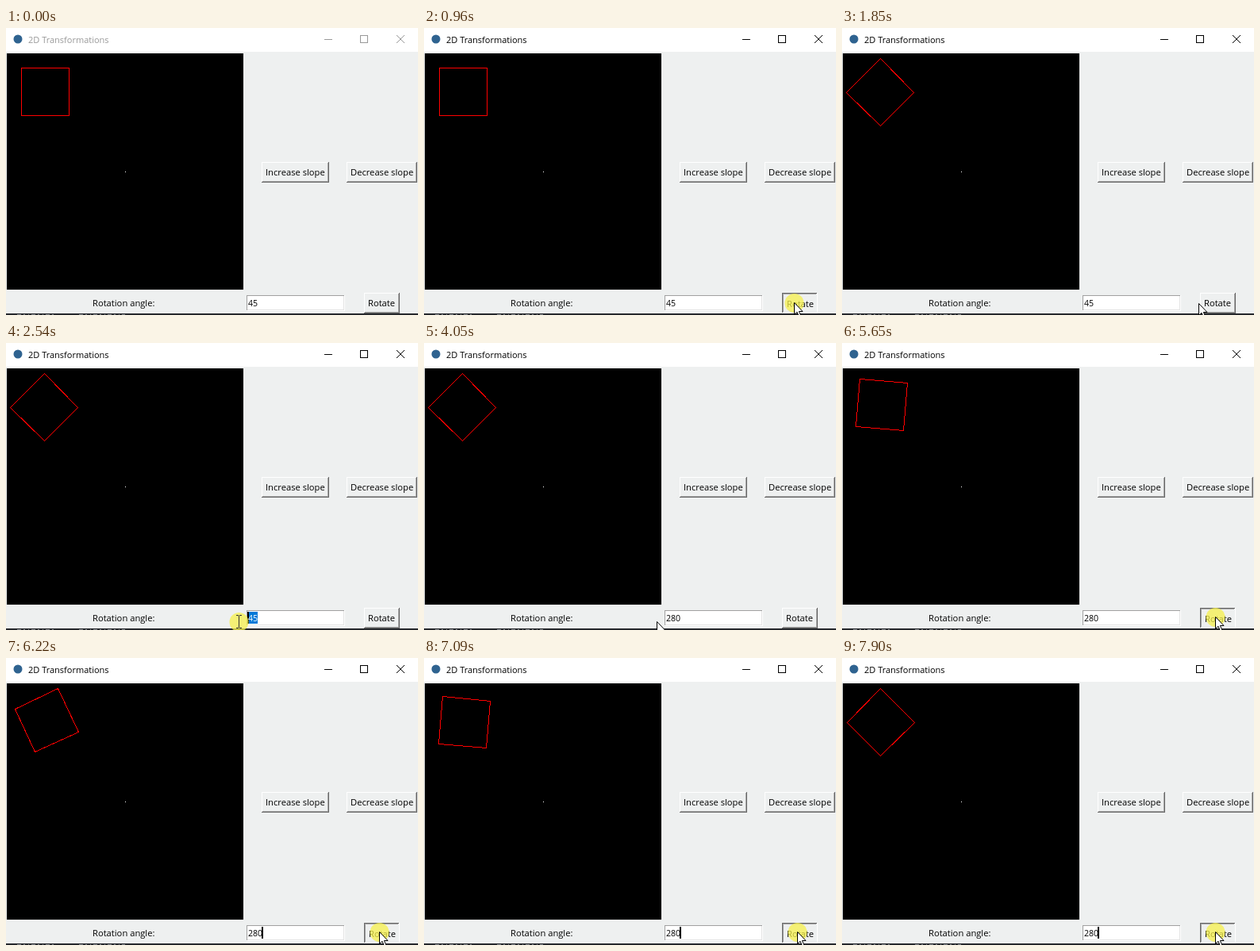
These frames come from a looping animation (519 by 362 pixels, 8000 ms). An HTML page:

```html
<!DOCTYPE html>
<html lang="en">
<head>
<meta charset="utf-8">
<title>2D Transformations</title>
<style>
html, body { margin: 0; width: 100%; height: 100%; overflow: hidden; background: #eef0f0; }
svg { display: block; width: 519px; height: 362px; font: 11.2px "Open Sans", "Noto Sans", sans-serif; }
text { white-space: pre; }
.crisp { shape-rendering: crispEdges; }
.line { fill: none; stroke-width: 1; }
</style>
</head>
<body>
<svg viewBox="0 0 519 362">
  <rect width="519" height="362" fill="#eef0f0"/>
  <rect width="519" height="30" fill="#fff"/>
  <circle cx="15" cy="14" r="5.5" fill="#2f6390"/>
  <text id="title" x="28" y="19" font-size="11">2D Transformations</text>
  <g id="chrome" class="line">
    <path class="crisp" d="M401 14.5H411M446.500 9.500H455.500V18.500H446.500Z"/>
    <path d="M492 9L502 19M502 9L492 19"/>
  </g>

  <rect class="crisp" x="1" y="32" width="298" height="298"/>
  <rect class="crisp" x="150" y="181" width="1" height="1" fill="#fff"/>
  <polygon id="shape" class="line crisp" stroke="#f00"/>

  <rect class="crisp" y="360" width="519" height="2" fill="#26282c"/>
  <path class="crisp" d="M14 361.500H60M92 361.500H150" stroke="#8b8e92" stroke-dasharray="5 3 2 4 1 3"/>

  <g id="buttons"></g>
  <text x="109" y="351">Rotation angle:</text>

  <g class="crisp">
    <rect x="303" y="337" width="124" height="20" fill="#fff"/>
    <path class="line" d="M303.500 356V337.500H426" stroke="#a0a0a0"/>
    <path class="line" d="M304 355.500H425.500V338" stroke="#e3e3e3"/>
    <rect id="sel" y="339" height="15" fill="#0078d7"/>
    <rect id="caret" y="339" width="2" height="15"/>
  </g>
  <g font-size="10.600">
    <text id="plain" x="305" y="351"></text>
    <text id="picked" y="351" fill="#fff"></text>
  </g>

  <g id="mouse">
    <circle id="glow" cx="0.500" cy="1" r="12" fill="#f6f04c" fill-opacity=".75"/>
    <path id="arrow" d="M.5 .5V15.500L4 12.300L6.400 18L8.800 17L6.400 11.500H11Z" fill="#fff" stroke="#000"/>
    <path id="beam" class="line crisp" d="M-3 -7.500H0M1 -7.500H4M.5 -7V8M-3 8.500H0M1 8.500H4" stroke="#333"/>
  </g>
</svg>
<script>
const LOOP = 8000;
const DIGIT = 6;
const $ = id => document.getElementById(id);
const show = (el, on) => el.setAttribute('visibility', on ? 'visible' : 'hidden');

// Mouse moves: from ms, to ms, end x, end y
const moves = [
  [30, 160, 496, 313], [310, 560, 466, 346], [1770, 1850, 449, 347], [1850, 2180, 371, 341],
  [2330, 2540, 293, 351], [4050, 4500, 425, 337], [4500, 4750, 470, 345]
];
const drag = { from: 2330, to: 2690 };
const typing = { from: 3060, gap: 210, text: '280' };

// Evenly spaced clicks on Rotate
const burst = (from, gap, count, hold) => Array.from({ length: count },
  (_, i) => ({ down: from + i * gap, up: from + i * gap + hold }));
const clicks = [
  ...burst(960, 305, 3, 50), ...burst(4840, 197, 7, 100),
  ...burst(6220, 145, 6, 50), ...burst(7090, 162, 6, 100)
];

const rad = deg => deg * Math.PI / 180;

// 45 degrees for each of three clicks, then 280, with a slow drift of the centre
function corners(n) {
  const late = Math.max(0, n - 3);
  const tilt = -45 * (n - late) - 280 * late;
  const a = rad(16.3 * late - 154);
  const [cx, cy] = late
    ? [49.5 + 1.75 * Math.cos(a), 79.4 + 1.75 * Math.sin(a)]
    : [49 - n / 2, 80 + n / 6];
  return [45, 135, 225, 315].map(d => [
    Math.round(cx + 42.4 * Math.cos(rad(tilt + d))) + .5,
    Math.round(cy + 42.4 * Math.sin(rad(tilt + d))) + .5
  ]);
}

function mouseAt(t) {
  let x = 448, y = 390;
  for (const [from, to, endX, endY] of moves) {
    const k = Math.min(1, Math.max(0, (t - from) / (to - from)));
    x += (endX - x) * k;
    y += (endY - y) * k;
  }
  return [Math.round(x), Math.round(y)];
}

function button(x, y, w, h, label, sunk) {
  const r = x + w - 1, b = y + h - 1, s = sunk ? 1 : 0;
  const [light, dark] = sunk ? ['#696969', '#fff'] : ['#fff', '#696969'];
  const inner = sunk
    ? `M${x + 1.5} ${b - 1}V${y + 1.5}H${r - 1}`
    : `M${x + 1} ${b - .5}H${r - .5}V${y + 1}`;
  return `<g class="line crisp"><path d="M${x + .5} ${b}V${y + .5}H${r}" stroke="${light}"/>
    <path d="M${x} ${b + .5}H${r + .5}V${y}" stroke="${dark}"/>
    <path d="${inner}" stroke="#a0a0a0"/></g>
    <text x="${x + 5 + s}" y="${y + 17 + s}">${label}</text>`;
}

let sunkNow = null;
function drawButtons(sunk) {
  if (sunk === sunkNow) return;
  sunkNow = sunk;
  $('buttons').innerHTML = button(322, 169, 85, 26, 'Increase slope')
    + button(429, 169, 89, 26, 'Decrease slope')
    + button(451, 334, 45, 26, 'Rotate', sunk);
}

function drawEntry(t, x) {
  const typed = Math.floor((t - typing.from) / typing.gap) + 1;
  const text = typed > 0 ? typing.text.slice(0, typed) : '45';
  const swept = Math.round((317 - x) / DIGIT);
  const count = t < drag.from || typed > 0 ? 0 : Math.max(0, Math.min(2, swept));
  const at = text.length - count;
  const left = 304 + DIGIT * at;
  $('sel').setAttribute('x', left + 1);
  $('sel').setAttribute('width', DIGIT * count);
  $('caret').setAttribute('x', left);
  show($('caret'), t >= drag.from && (t - 2320) % 890 < 600);
  $('plain').textContent = text.slice(0, at);
  $('picked').setAttribute('x', left + 1);
  $('picked').textContent = text.slice(at);
}

function draw(t) {
  const turns = clicks.filter(c => c.up <= t).length;
  const pressed = clicks.some(c => t >= c.down && t < c.up);
  const dragging = t >= drag.from && t < drag.to;
  const [x, y] = mouseAt(t);
  const beam = dragging || (x >= 303 && x < 427 && y >= 337 && y < 357);
  const ink = t >= clicks[0].down ? '#000' : '#999';

  $('title').setAttribute('fill', ink);
  $('chrome').setAttribute('stroke', ink);
  $('shape').setAttribute('points', corners(turns).join(' '));
  drawButtons(pressed);
  drawEntry(t, x);
  $('mouse').setAttribute('transform', `translate(${x} ${y})`);
  show($('glow'), pressed || dragging);
  show($('beam'), beam);
  show($('arrow'), !beam);
}

const start = performance.now();
function tick() {
  draw((performance.now() - start) % LOOP);
  requestAnimationFrame(tick);
}
tick();
</script>
</body>
</html>
```
